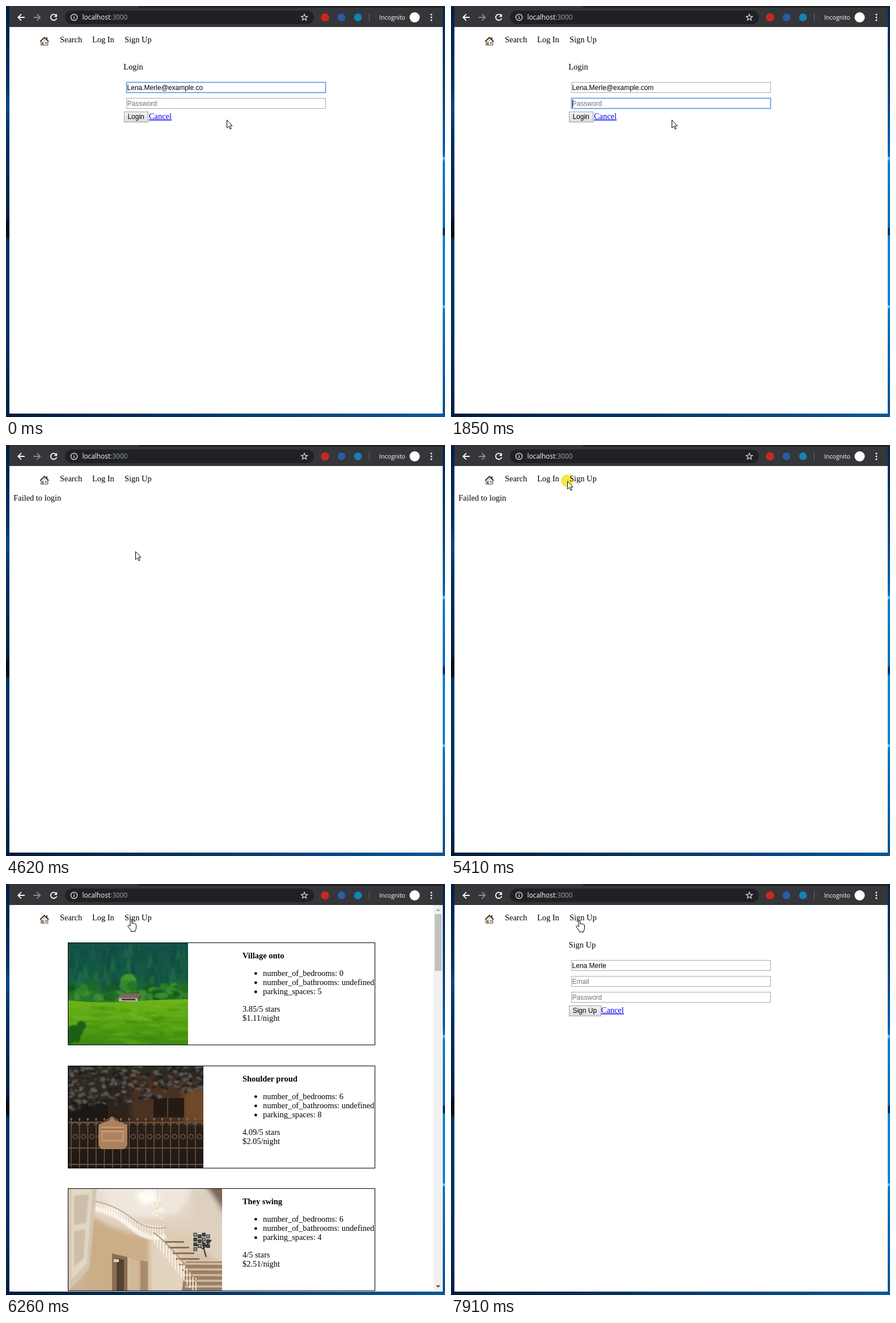
An HTML page that plays this animation: 774 by 724 pixels, repeating every 8000 ms.

```html
<!DOCTYPE html>
<html lang="en">
<head>
<meta charset="utf-8">
<title>Login demo</title>
<style>
  html, body { margin: 0; width: 100%; height: 100%; overflow: hidden; background: #fff; }
  svg { display: block; }
  text { white-space: pre; }
  .s { font: 14.4px "Liberation Serif", "Times New Roman", serif; }
  .b { font-weight: bold; }
  .a { font: 12px "Liberation Sans", Arial, sans-serif; }
  .u { font-family: "Open Sans", "Noto Sans", sans-serif; }
  .link { fill: #0000ee; text-decoration: underline; }
</style>
</head>
<body>
<svg id="stage" width="774" height="724" viewBox="0 0 774 724"></svg>
<script>
const LOOP = 8000;
const USER = 'Lena Merle';
const MAIL = 'Lena.Merle@example.com';

let seed = 11;
const rnd = (a = 0, b = 1) => {
  seed = (seed * 16807) % 2147483647;
  return a + (b - a) * seed / 2147483647;
};
const many = (n, f) => Array.from({ length: n }, (_, i) => f(i)).join('');
const rect = (x, y, w, h, fill, more = '') =>
  `<rect x="${x}" y="${y}" width="${w}" height="${h}" fill="${fill}" ${more}/>`;
const path = (d, fill, more = '') => `<path d="${d}" fill="${fill}" ${more}/>`;
const line = (d, color, w = 1, more = '') =>
  path(d, 'none', `stroke="${color}" stroke-width="${w}" ${more}`);
const disc = (x, y, r, fill, more = '') =>
  `<circle cx="${x}" cy="${y}" r="${r}" fill="${fill}" ${more}/>`;
const oval = (x, y, rx, ry, fill, more = '') =>
  `<ellipse cx="${x}" cy="${y}" rx="${rx}" ry="${ry}" fill="${fill}" ${more}/>`;
const text = (x, y, s, cls = 's', more = '') =>
  `<text x="${x}" y="${y}" class="${cls}" ${more}>${s}</text>`;
const group = (id, body) => `<g id="${id}">${body}</g>`;
const soft = (px, body) => `<g filter="url(#blur${px})">${body}</g>`;
const grad = (id, stops, dir = 'x2="0" y2="1"') =>
  `<linearGradient id="${id}" ${dir}>` + stops.map(([o, c]) =>
    `<stop offset="${o}" stop-color="${c}"/>`).join('') + '</linearGradient>';

const defs = '<defs>' +
  [1, 4].map(n => `<filter id="blur${n}"><feGaussianBlur stdDeviation="${n}"/></filter>`).join('') +
  grad('left', [[0, '#001f42'], [.2, '#00356a'], [.24, '#0a4784'], [.3, '#003468'], [.51, '#002246'],
    [.53, '#000d1c'], [.56, '#000d1c'], [.57, '#003566'], [.8, '#003263'], [1, '#002144']]) +
  grad('right', [[0, '#032548'], [.18, '#053f78'], [.35, '#0762a6'], [.366, '#0d75bd'], [.37, '#9cc8e6'],
    [.378, '#0f7fc9'], [.538, '#0a6cb4'], [.542, '#04315f'], [.556, '#04315f'], [.56, '#0b85cf'],
    [.727, '#0d86d0'], [.731, '#a5cfea'], [.737, '#0c7fc8'], [.77, '#0b70b6'], [1, '#07508d']]) +
  grad('foot', [[0, '#001c3b'], [.5, '#00396d'], [1, '#075796']], 'x2="1" y2="0"') +
  grad('btn', [[0, '#f4f4f4'], [1, '#dcdcdc']]) +
  grad('forest', [[0, '#14504a'], [.5, '#145a42'], [1, '#2a7d2c']]) +
  grad('grass', [[0, '#6fb41a'], [.5, '#57a313'], [1, '#3c8a12']]) +
  grad('dusk', [[0, '#2f2924'], [.5, '#2c221b'], [1, '#1d1714']]) +
  grad('hall', [[0, '#ebe1d5'], [.5, '#dccbb4'], [1, '#c9b191']]) +
  '</defs>';

const house =
  path('M61.7 62V69H73.8V62L67.7 56.2Z', '#f4eee6', 'stroke="#57493f" stroke-width="1"') +
  rect(71, 55, 2, 4, '#6b3a2b') +
  line('M60.2 62.6L67.7 55.3 75.2 62.6', '#3d2d24', 1.8) +
  rect(63.2, 63.4, 3.2, 5.4, '#b5652f') + rect(69, 63.4, 3.5, 3.2, '#54a5d6') +
  disc(67.7, 60, 1, '#54a5d6');

const star = 'M526 14.4' + many(9, i => {
  const r = i % 2 ? 5.8 : 2.5, k = (i + 1) * Math.PI / 5;
  return `L${(526 + r * Math.sin(k)).toFixed(2)} ${(20.2 - r * Math.cos(k)).toFixed(2)}`;
}) + 'Z';

const chrome =
  rect(0, 0, 6, 724, 'url(#left)') + rect(769, 0, 5, 724, 'url(#right)') +
  rect(0, 717, 774, 7, 'url(#foot)') +
  rect(6, 0, 764, 37, '#35363a') + path('M232 0H770V3H236Q232 3 232 0Z', '#202124') +
  rect(104, 8, 439, 24, '#202124', 'rx="12"') +
  line('M33 20H21.5M27 14.3L21.3 20 27 25.7', '#fff', 1.8) +
  line('M48.5 20H60M54.5 14.3L60.2 20 54.5 25.7', '#8b8c8f', 1.8) +
  line('M88 16.2A5.3 5.3 0 1 0 89.3 21.4', '#fff', 1.8) + path('M90 13.8V19.3H84.5Z', '#fff') +
  disc(120, 20, 5.6, 'none', 'stroke="#e8eaed" stroke-width="1.3"') +
  rect(119.3, 19, 1.4, 4, '#e8eaed') + rect(119.3, 16.7, 1.4, 1.4, '#e8eaed') +
  text(134.4, 24.4, 'localhost<tspan fill="#9aa0a6">:3000</tspan>', 'u', 'font-size="11.87" fill="#fff"') +
  line(star, '#dfe1e5', 1.2) +
  disc(562.5, 20, 7.3, '#c62a1d') + disc(591.5, 20, 6.8, '#2b5ba8') + disc(620.5, 20, 6.8, '#1483b8') +
  rect(640, 13, 1, 14, '#6b6d71') +
  text(658, 23.8, 'Incognito', 'u', 'font-size="10.6" fill="#fff"') + disc(720.5, 20, 9, '#fff') +
  many(3, i => disc(750, 15 + 5 * i, 1.5, '#fff')) +
  rect(6, 37, 764, 681, '#fff');

const nav = house + text(95, 64, 'Search') + text(152, 64, 'Log In') + text(209, 64, 'Sign Up');

const field = (y, id = '') => `<rect ${id && `id="${id}"`} x="212.5" y="${y + .5}" width="351" height="18" fill="#fff" stroke="#a9a9a9"/>`;
const hint = (y, s, id = '') => text(213.6, y, s, 'a', `fill="#757575" ${id && `id="${id}"`}`);
const button = (y, w, label, id = '') =>
  `<rect ${id && `id="${id}"`} x="208.5" y="${y + .5}" width="${w}" height="18" fill="url(#btn)" stroke="#a0a0a0"/>` +
  text(214.4, y + 13.2, label, 'a');

const login = group('login',
  text(207.3, 112, 'Login') + field(134, 'mailBox') + field(162, 'passBox') +
  text(213.6, 148, '', 'a', 'id="mail"') + hint(176, 'Password', 'passHint') +
  text(213.6, 176, '', 'a', 'id="pass"') +
  button(186, 42, 'Login', 'go') + text(252, 199, 'Cancel', 's link') +
  '<rect id="caret" width="1" height="14" fill="#000"/>');

const signup = group('signup',
  text(207.6, 112, 'Sign Up') + field(134) + field(162) + field(190) +
  text(213.6, 148, USER, 'a') + hint(176, 'Email') + hint(204, 'Password') +
  button(214, 56, 'Sign Up') + text(264.8, 227, 'Cancel', 's link'));

// Photo stand-ins, 179 px high each
const meadow = () => rect(0, 0, 211, 110, 'url(#forest)') +
  soft(1, many(90, i => {
    const x = rnd(-5, 215), y = i * .75, h = rnd(14, 26);
    const c = ['#0d4540', '#175c48', '#104d3e', '#22704c'][i % 4];
    return path(`M${x} ${y - 6}L${x + 6} ${y + h}H${x - 6}Z`, c, 'opacity=".6"');
  }) +
  many(60, i => oval(rnd(0, 211), rnd(76, 98), rnd(5, 12), rnd(4, 8),
    ['#1d6a22', '#2f8428', '#17561f', '#3f9030'][i % 4], 'opacity=".85"'))) +
  path('M0 101Q50 107 110 103T211 99V180H0Z', 'url(#grass)') +
  soft(1, disc(106, 68, 14, '#43982f') + disc(100, 75, 10, '#358629') + disc(113, 75, 9, '#2b7526') +
    many(70, i => oval(rnd(0, 205), rnd(106, 178), rnd(8, 24), rnd(1.5, 4),
      i % 2 ? '#33800f' : '#79bd26', 'opacity=".28"')) +
    many(12, () => disc(rnd(0, 26), rnd(144, 178), rnd(5, 10), '#1f6115'))) +
  path('M85 98L95 89H131L122 98Z', '#7d6660') + rect(89, 97, 33, 6, '#bcb0a5') + rect(94, 98, 24, 3, '#4a3a35');

const gate = () => rect(0, 0, 238, 180, 'url(#dusk)') +
  soft(4, path('M110 14L250 30V98H110Z', '#4a3020') + rect(203, 40, 45, 60, '#70482c')) +
  rect(150, 56, 54, 34, '#241a15') + rect(174, 56, 2, 34, '#5f4029') + rect(0, 62, 70, 34, '#1d1815') +
  soft(1, many(420, i => {
    const x = rnd(-4, 238), y = rnd() * (80 - x * .16);
    const c = ['#1c1a18', '#3b3835', '#56524e', '#2a2724', '#625e5a'][i % 5];
    return oval(x, y, rnd(2, 5.5), rnd(1.2, 3), c, `transform="rotate(${rnd(-35, 35)} ${x} ${y})"`);
  })) +
  many(17, i => {
    const x = 5 + 14.6 * i;
    return line(`M${x} 94V180M${x} 104q7 -12 13 0M${x + 7} 128a4 4 0 1 1 .1 0`, '#775b45', 1.4) +
      disc(x, 93, 1.8, '#8d6b50');
  }) +
  line('M0 99H238M0 144H238M0 173H238', '#6e523d', 1.8) +
  path('M53 103L77 93 104 103V140L98 146H58L53 140Z', '#ad805c') + rect(58, 106, 40, 27, '#c0946f') +
  rect(58, 110, 40, 2, '#8d6443') + rect(61, 117, 34, 12, '#ae8260') +
  disc(77, 93, 4, '#b78862') + line('M66 96q11 -9 22 0', '#8d6443', 2);

const hall = () => rect(0, 0, 271, 180, 'url(#hall)') +
  soft(4, path('M60 -10H220L195 42Q130 60 72 40Z', '#efe7dd') + path('M118 8L150 0 162 20 130 30Z', '#fffdf8') +
    path('M35 44Q80 74 143 86V195H28Z', '#cbae88') + path('M143 86L182 90 236 195H143Z', '#e3d4bf') +
    path('M214 0H285V140L222 100Z', '#ddd0bf') + path('M238 -9H285V62Q262 18 238 -9Z', '#7b6656')) +
  soft(1, path('M0 0H50L37 140 0 180Z', '#d3c5b1') + path('M5 0H43L32 132 5 160Z', '#e2d6c5') +
    path('M10 12L36 10 31 60 10 64ZM10 75L30 71 27 122 10 138Z', '#cdbea9')) +
  path('M77 114L104 120V180H77Z', '#8b6e52') + path('M85 122L98 125V180H85Z', '#554234') +
  path('M104 120L124 128V180H104Z', '#cfb999') + path('M127 126L140 128V180H127Z', '#a98b69') +
  soft(1, line('M48 34Q86 44 112 68T172 84', '#f6efe6', 8)) +
  many(27, i => {
    const x = 50 + 4.5 * i, y = 31 + 44 / (1 + Math.exp(-(i - 10) / 4));
    return line(`M${x} ${y - 9}v17`, '#fffaf3', 1.3);
  }) +
  line('M48 22Q86 30 112 52T172 68', '#b79c7c', 1.3) +
  path('M200 180L207 128H271V180Z', '#9c8067') +
  many(9, i => path(`M${170 + 6 * i} ${92 + 10 * i}H${204 + 9 * i}v3H${172 + 6 * i}Z`, '#8c6f54')) +
  many(5, i => rect(202 + i, 130 + 10 * i, 70, 4, '#cdb79c')) +
  many(15, i => line(`M${152 + 5.2 * i} ${78 + 5.6 * i}v${18 + i}`, '#fffaf2', 1.6)) +
  line('M150 77Q190 106 228 166', '#a98d6c', 1.6) +
  line('M243 120Q238 106 236 86M238 106L224 97M239 104L252 90', '#2c2a28', 2) +
  many(13, i => rect(221 + (i % 4) * 7.5, 78 + Math.floor(i / 4) * 8.5 + (i % 2) * 3, 5.5, 5.5,
    i % 3 ? '#4a4846' : '#8a979a', 'stroke="#242220"')) +
  line('M157 0V18M146 32Q157 16 168 32M148 40Q157 30 166 40', '#e6d3ab', 1.2) +
  soft(1, many(14, () => disc(rnd(146, 168), rnd(25, 52), 2, '#fff6df'))) +
  rect(80, 124, 9, 5, '#e0d2bc');

const card = (i, w, photo, title, beds, cars, stars, price) => {
  const y = Math.round(103 + 216.6 * i), rows = [`bedrooms: ${beds}`, 'bathrooms: undefined'];
  const items = [...rows.map(r => 'number_of_' + r), `parking_spaces: ${cars}`];
  return `<svg x="110" y="${y + 1}" width="${w}" height="179">${photo()}</svg>` +
    rect(109.5, y + .5, 541, 180, 'none', 'stroke="#000"') +
    text(417, y + 28, title, 's b') +
    items.map((s, k) => disc(440.3, y + 54.6 + 16.2 * k, 2.4, '#000') + text(453, y + 58.6 + 16.2 * k, s)).join('') +
    text(417, y + 122, `${stars}/5 stars`) + text(417, y + 138, `$${price}/night`);
};

const list = group('list',
  card(0, 211, meadow, 'Village onto', 0, 5, '3.85', '1.11') +
  card(1, 238, gate, 'Shoulder proud', 6, 8, '4.09', '2.05') +
  card(2, 271, hall, 'They swing', 6, 4, '4', '2.51') +
  rect(754, 37, 15, 680, '#f1f1f1') + rect(756, 53, 12, 100, '#c1c1c1') +
  path('M758 47.5H766L762 43.5Z', '#a3a3a3') + path('M758 707H766L762 711Z', '#505050'));

const ink = 'stroke="#000" stroke-width="1" stroke-linejoin="round"';
const arrow = path('M.5 .7V14.8L3.8 11.8 6.2 17 8.2 16.1 5.9 11H10Z', '#fff', `id="arrow" ${ink}`);
const hand = path('M0 11V1.8Q0 .5 1.4 .5T2.8 1.8V7.5Q3 6.6 4.3 6.6T5.6 8Q6 7.2 7.1 7.3T8.4 8.8Q9 8.2 9.7 8.5' +
  'T10.5 10V15Q10.5 17.5 9 19V21.5H1.2V19.5L-3.8 13Q-4.6 11.3 -3.2 10.6T0 12.2Z', '#fff', `id="hand" ${ink}`);

document.getElementById('stage').innerHTML = defs + chrome + nav + login + signup + list +
  text(13.3, 0, 'Failed to login', 's', 'id="note"') +
  group('mouse', disc(0, 0, 11, '#f4e84a', 'id="spot" style="mix-blend-mode:multiply"') + arrow + hand);

const el = id => document.getElementById(id);
const show = (id, on) => { el(id).style.display = on ? '' : 'none'; };
const attr = (id, o) => { for (const k in o) el(id).setAttribute(k, o[k]); };
const within = (t, a, b) => t >= a && t < b;

// Pointer keys: time, x, y, 1 for the hand
const keys = [[0, 389, 200, 0]];
for (let i = 1; i <= 9; i++) {
  const f = i / 9, ease = f * f * (3 - 2 * f);
  keys.push([3270 + 76.2 * (i - 1), 389 - 152 * ease, 200 + 16 * Math.sin(Math.PI * f), 0]);
}
keys.push(
  [4620, 228, 187, 0], [4695, 203, 130, 0], [4770, 184, 80, 0],
  [4940, 180, 76, 0], [5013, 188, 71, 0], [5087, 197, 66, 0], [5160, 205, 63, 0],
  [5730, 211, 62, 1], [5807, 215, 62, 1], [5883, 219, 62, 1],
  [6490, 224, 76, 0], [6570, 227, 89, 0], [7200, 227, 84, 0],
  [7520, 226, 75, 0], [7593, 225, 67, 1], [7667, 225, 63, 1]);

const clicks = [[4050, 4220], [5410, 5560], [5960, 6110], [7740, 7910]];

function draw(t) {
  show('login', t < 4220);
  show('signup', within(t, 6110, 6260) || t >= 7910);
  show('list', within(t, 6260, 7910));
  show('note', within(t, 4220, 6260));
  attr('note', { y: t < 6110 ? 97.5 : 260 });

  el('mail').textContent = t < 680 ? MAIL.slice(0, -1) : MAIL;
  const pasted = t >= 2550;
  show('passHint', !pasted);
  el('pass').textContent = pasted ? '•'.repeat(MAIL.length) : '';

  const ring = (id, on) => attr(id, { stroke: on ? '#6a9ee8' : '#a9a9a9', 'stroke-width': on ? 1.8 : 1 });
  ring('mailBox', t < 1850);
  ring('passBox', within(t, 1850, 4050));
  const blink = [[210, 1230], [1780, 2400], [2550, 3100], [3650, 4050]];
  show('caret', blink.some(([a, b]) => within(t, a, b)));
  attr('caret', { x: t < 680 ? 348 : t < 1850 ? 358 : pasted ? 307 : 214, y: t < 1850 ? 137 : 165 });

  const [, x, y, over] = keys.filter(k => k[0] <= t).pop();
  const hover = x < 251 && y < 205;
  attr('go', {
    fill: t >= 4050 ? '#d2d2d2' : hover ? '#ececec' : 'url(#btn)',
    stroke: hover ? '#8a8a8a' : '#a0a0a0'
  });
  attr('mouse', { transform: `translate(${Math.round(x)} ${Math.round(y)})` });
  show('arrow', !over);
  show('hand', over);
  show('spot', clicks.some(([a, b]) => within(t, a, b)));
}

const start = performance.now();
function tick(now) {
  draw(Math.max(0, now - start) % LOOP);
  requestAnimationFrame(tick);
}
draw(0);
requestAnimationFrame(tick);
</script>
</body>
</html>
```
